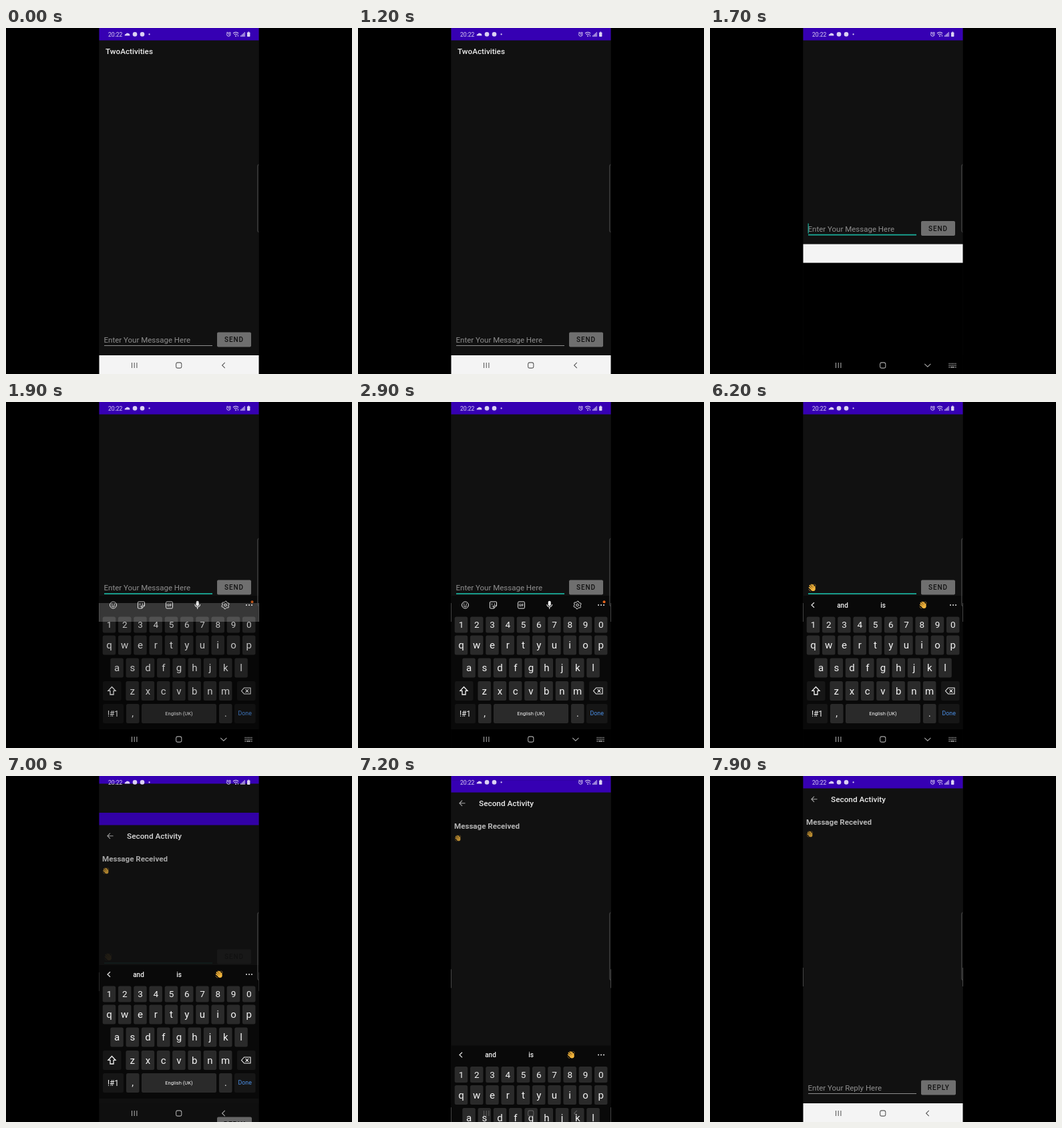
These frames come from a looping animation (518 by 518 pixels, 8 s). An HTML page:

```html
<!DOCTYPE html>
<html lang="en">
<head>
<meta charset="utf-8">
<title>Two screens</title>
<style>
html, body { margin: 0; width: 100%; height: 100%; overflow: hidden; background: #000; }
svg { display: block; width: 100vw; height: 100vh; }
text { font-family: Roboto, "Open Sans", sans-serif; }
</style>
</head>
<body>
<svg viewBox="0 0 518 518">
  <defs>
    <clipPath id="screen"><rect x="139.5" width="239" height="518"/></clipPath>
    <g id="hand" stroke-linecap="round" fill="none">
      <path d="M-3.6 -3.2L0 1.2M-1.4 -4.6L1.4 0M1 -4.4L3 0M3.8 -1.6L3.6 2M-4.4 -.4L-.6 3" stroke="#f2b53c" stroke-width="1.8"/>
      <ellipse cx="1.4" cy="2" rx="3.3" ry="3.1" fill="#f2b53c"/>
      <path d="M-2.2 -3.4L.8 .2M-.2 -3.8L2 -.4M-3.2 -1.2L-.2 1.8" stroke="#7d4f17" stroke-width=".5"/>
      <path d="M-5.2 2.4Q-4.6 4.6 -2.4 5.2M3.4 -5.2Q5 -4.6 5.3 -3" stroke="#a87a35" stroke-width=".8"/>
    </g>
  </defs>
  <g id="stage" clip-path="url(#screen)"></g>
</svg>
<script>
const LOOP = 8000, STEP = 100, PAN = 189;
const stage = document.getElementById('stage');

function add(parent, tag, attrs = {}, content) {
  const el = document.createElementNS('http://www.w3.org/2000/svg', tag);
  for (const k in attrs) el.setAttribute(k, attrs[k]);
  if (content !== undefined) el.textContent = content;
  parent.appendChild(el);
  return el;
}
const group = (p, attrs) => add(p, 'g', attrs);
const rect = (p, x, y, width, height, fill, rx = 0) => add(p, 'rect', { x, y, width, height, fill, rx });
const path = (p, d, stroke, width = 1, fill = 'none') =>
  add(p, 'path', { d, stroke, 'stroke-width': width, fill });
const dot = (p, cx, cy, r, fill) => add(p, 'circle', { cx, cy, r, fill });
const label = (p, str, x, y, size, fill, more = {}) =>
  add(p, 'text', { x, y, 'font-size': size, fill, ...more }, str);
const hand = (p, x, y, s = 1, opacity = 1) =>
  add(p, 'use', { href: '#hand', transform: `translate(${x} ${y}) scale(${s})`, opacity });
const show = (el, on) => el.setAttribute('visibility', on ? 'inherit' : 'hidden');
const move = (el, y) => el.setAttribute('transform', `translate(0 ${y})`);
const clamp = v => Math.max(0, Math.min(1, v));
const MID = { 'text-anchor': 'middle' };

function messageBar(p, hint, action, textX, width) {
  const bar = { hint: label(p, hint, 146.5, 471.3, 11.5, '#8f8f8f') };
  bar.line = rect(p, 147, 475, 162, 1, '#8c8c8c');
  bar.button = rect(p, 316, 455.5, width, 22, '#6f6f6f', 2);
  label(p, action, textX, 470.3, 10, '#101010', { 'font-weight': 500, 'letter-spacing': .89 });
  return bar;
}

// First screen
rect(stage, 139, 0, 240, 518, '#111');
const navDark = rect(stage, 139, 490, 240, 28, '#000');
const below = rect(stage, 139, 300, 240, 218, '#000');
const first = group(stage);
rect(first, 139, 0, 240, 490, '#111');
rect(first, 139, 490, 240, 28, '#f4f4f4');
label(first, 'TwoActivities', 149, 39.2, 11.7, '#ececec', { 'font-weight': 500 });
const bar = messageBar(first, 'Enter Your Message Here', 'SEND', 327, 51);
const focusLine = rect(first, 147, 475.2, 162, 1.8, '#19ab98');
const typed = label(first, '', 146.5, 471.3, 11.5, '#f0f0f0');
const typedLine = rect(first, 147, 473, 11, .8, '#d8d8d8');
const wave = hand(first, 153, 467);
const caret = rect(first, 147, 459, 1.2, 15, '#19ab98');
const firstStatus = rect(stage, 139, 0, 240, 18.5, '#3600b3');

// Second screen
const second = group(stage);
rect(second, 139, 0, 240, 490, '#111');
rect(second, 139, 490, 240, 28, '#f4f4f4');
rect(second, 139, 0, 240, 18.5, '#3600b3');
path(second, 'M160.5 34.7H152M156 30.6L151.9 34.7L156 38.8', '#a8a8a8', 1.1);
label(second, 'Second Activity', 181, 39.2, 11.8, '#ececec', { 'font-weight': 500 });
label(second, 'Message Received', 144, 72.6, 11.6, '#b4b4b4', { 'font-weight': 700 });
hand(second, 149.5, 87, .82, .75);
messageBar(second, 'Enter Your Reply Here', 'REPLY', 325.8, 52);

// Keyboard
const board = group(stage);
rect(board, 139, 290, 240, 200, '#090909');
const tools = group(board), words = group(board);
const INK = '#e6e6e6';

function toolIcons(p) {
  add(p, 'circle', { cx: 160.5, cy: 304, r: 5, stroke: INK, fill: 'none' });
  dot(p, 158.7, 302.6, .8, INK);
  dot(p, 162.3, 302.6, .8, INK);
  path(p, 'M157.8 305.2Q160.5 308.8 163.2 305.2Z', INK, .7);
  path(p, 'M198.5 299H206.5Q207.5 299 207.5 300V305L203.5 309H198.5Q197.5 309 197.5 308V300Q197.5 299 198.5 299ZM207.5 305H203.5V309', INK);
  dot(p, 200.5, 302.6, .8, INK);
  dot(p, 204.5, 302.6, .8, INK);
  path(p, 'M200 305Q201.5 307 203.3 305.6', INK, .8);
  add(p, 'rect', { x: 239.5, y: 299, width: 10, height: 10, rx: 1.5, stroke: INK, fill: 'none' });
  label(p, 'GIF', 244.5, 305.8, 4.6, INK, { ...MID, 'font-weight': 700 });
  rect(p, 284.7, 297.8, 4, 7.6, '#fff', 2);
  path(p, 'M282.7 303Q282.9 307 286.7 307Q290.5 307 290.7 303M286.7 307V310', '#fff');
  let gear = '';
  for (let i = 0; i < 24; i++) {
    const a = i * Math.PI / 12, r = i % 4 < 2 ? 5.8 : 4.5;
    gear += `${i ? 'L' : 'M'}${328.5 + r * Math.sin(a)} ${304 - r * Math.cos(a)}`;
  }
  path(p, gear + 'Z', INK);
  add(p, 'circle', { cx: 328.5, cy: 304, r: 1.8, stroke: INK, fill: 'none' });
  dot(p, 368.5, 299.2, 2, '#e8641b');
}
toolIcons(tools);
[360, 364, 368].forEach(x => dot(board, x, 304, 1, INK));

const chip = rect(words, 286, 291, 66, 28, '#3a3a3a', 3);
path(words, 'M156 300.2L152 304L156 307.8', INK, 1.2);
const word = x => label(words, '', x, 307.6, 10, '#f2f2f2', { ...MID, 'font-weight': 500 });
const wordA = word(198.5), wordB = word(259);
const suggestedWave = hand(words, 319, 304, .98);

const keys = {};
function key(name, x, y, w, h, size = 15, fill = '#2a2a2a', ink = '#f4f4f4') {
  const cap = rect(board, x, y, w, h, fill, 2.5);
  const text = label(board, name, x + w / 2, y + h / 2 + size * .34, size, ink, MID);
  keys[name] = { cap, text, fill };
}
function keyRow(chars, x, y, h, size) {
  [...chars].forEach((c, i) => key(c, x + i * 23.25, y, 19.5, h, size));
}
const SPECIAL = '#161616';
keyRow('1234567890', 144.7, 321.5, 24, 13.5);
keyRow('qwertyuiop', 144.7, 349.5, 29, 15);
keyRow('asdfghjkl', 156.3, 383.5, 29, 15);
keyRow('zxcvbnm', 179.4, 418, 29, 15);
const shiftKey = rect(board, 145, 418, 27.5, 29, SPECIAL, 2.5);
const shiftIcon = path(board, 'M158.5 426.5L153 432.4H156V438H161V432.4H164Z', '#f2f2f2', 1.3);
rect(board, 346, 418, 27.5, 29, SPECIAL, 2.5);
path(board, 'M352.5 432.5L356.5 428H366V437H356.5ZM358.6 430.2L363.2 434.8M363.2 430.2L358.6 434.8', '#f2f2f2', 1.1);
key('!#1', 145, 452, 31, 29, 12, SPECIAL);
key(',', 180, 452, 19.5, 29, 14);
key('English (UK)', 203, 452, 112, 29, 7.6);
key('.', 319, 452, 19.5, 29, 14);
key('Done', 342, 452, 31.5, 29, 8.8, SPECIAL, '#4b8fe6');

// System bars
const STATUS = '#dcd2f4';
label(stage, '20:22', 153, 12.7, 8.6, STATUS);
path(stage, 'M177.6 11.4Q177.4 9 179.6 9Q180.6 6.6 182.8 8Q185.6 8.2 185.4 11.4Z', 'none', 0, STATUS);
dot(stage, 193, 9.4, 3.3, STATUS);
dot(stage, 204, 9.4, 3.3, STATUS);
dot(stage, 214.6, 9.4, 1.1, STATUS);
add(stage, 'circle', { cx: 333.3, cy: 9.6, r: 2.7, stroke: STATUS, fill: 'none' });
path(stage, 'M333.3 8V9.8H334.8M330 7.4L331.8 6M336.6 7.4L334.8 6', STATUS, .9);
path(stage, 'M340 8Q344 4.6 348 8M341.6 10Q344 8 346.4 10', STATUS, 1.1);
dot(stage, 344, 12, .9, STATUS);
path(stage, 'M347.3 10V13', STATUS, .8);
for (let i = 0; i < 4; i++) rect(stage, 351.2 + i * 1.8, 11 - i * 1.6, 1.1, 2 + i * 1.6, STATUS);
rect(stage, 361, 6.5, 4.4, 6.5, STATUS, .8);
rect(stage, 362.2, 5.6, 2, 1.2, STATUS);

const nav = group(stage, { fill: 'none', 'stroke-width': 1.1 });
add(nav, 'path', { d: 'M188.5 501V509M192.2 501V509M195.9 501V509' });
add(nav, 'rect', { x: 254.6, y: 500.9, width: 8.2, height: 8.2, rx: 2.4 });
const back = add(nav, 'path', { d: 'M327.8 500.8L323.6 505L327.8 509.2' });
const hide = add(nav, 'path', { d: 'M321.2 502.8L325.8 507.2L330.4 502.8' });
const boardIcon = group(nav);
add(boardIcon, 'path', { d: 'M357.5 502.4H368.5M357.5 505H368.5', 'stroke-dasharray': '1.4 1', 'stroke-width': 1.4 });
add(boardIcon, 'path', { d: 'M357.5 507.8H359M360 507.8H366M367 507.8H368.5', 'stroke-width': 1.4 });
path(stage, 'M378.5 204Q376.8 204.5 376.8 207V303Q376.8 305.5 378.5 306', '#565656', .9);

const CARET_ON = [[1300, 1800], [2300, 2800], [3300, 4000], [4700, 5200], [5700, 6200]];
const between = (t, a, b) => t >= a && t < b;

function drawField(t) {
  const focus = t >= 1300, sent = t >= 5700;
  const text = t < 3500 || sent ? '' : t < 3800 ? 'H' : 'Hi';
  show(bar.hint, t < 3500);
  show(bar.line, !focus);
  show(focusLine, focus);
  typed.textContent = text;
  show(typedLine, text);
  typedLine.setAttribute('width', text === 'H' ? 8 : 11);
  show(wave, sent);
  caret.setAttribute('x', sent ? 159.5 : [146.6, 155.5, 158.6][text.length]);
  show(caret, CARET_ON.some(([a, b]) => between(t, a, b)));
  bar.button.setAttribute('fill', between(t, 6500, 6800) ? '#8a8a8a' : '#6f6f6f');
}

function drawKeys(t) {
  const caps = between(t, 3300, 3500), sent = t >= 5700;
  for (const k in keys) {
    if (/^[a-z]$/.test(k)) keys[k].text.textContent = caps ? k.toUpperCase() : k;
    const down = k === 'h' && between(t, 3500, 3600) || k === 'i' && between(t, 3800, 3900);
    keys[k].cap.setAttribute('fill', down ? '#505050' : keys[k].fill);
  }
  shiftKey.setAttribute('fill', between(t, 3300, 3400) ? '#3a3a3a' : SPECIAL);
  shiftIcon.setAttribute('fill', caps ? '#f2f2f2' : 'none');
  show(tools, t < 3500);
  show(words, t >= 3500);
  show(chip, between(t, 5600, 5800));
  show(suggestedWave, t >= 3800);
  wordA.textContent = sent ? 'and' : 'His';
  wordB.textContent = sent ? 'is' : 'Him';
}

function draw(t) {
  const opening = t >= 1500;
  const pan = PAN * (1 - (1 - clamp((t - 1500) / 394)) ** 3);
  const p = clamp((t - 6700) / 600);
  const lift = -14 * p;

  show(navDark, opening);
  show(below, between(t, 1600, 6800));
  move(first, lift - pan);
  move(firstStatus, lift);
  drawField(t);

  show(second, p > 0);
  move(second, 220 * (1 - p) ** 2);
  second.setAttribute('opacity', Math.min(1, p * 1.84));

  const drop = 230 * clamp((t - 7000) / 300) ** 1.5;
  show(board, between(t, 1800, 7300));
  move(board, lift + drop);
  board.setAttribute('opacity', clamp(.35 + (t - 1800) / 220));
  drawKeys(t);

  const light = !opening || t >= 7200, plainBack = !opening || t >= 6900;
  nav.setAttribute('stroke', light ? '#5c5c5c' : '#a6a6a6');
  show(back, plainBack);
  show(hide, !plainBack);
  show(boardIcon, !plainBack);
}

function tick() {
  const t = performance.now() % LOOP;
  draw(Math.floor(t / STEP) * STEP);
  requestAnimationFrame(tick);
}
draw(0);
requestAnimationFrame(tick);
</script>
</body>
</html>
```
